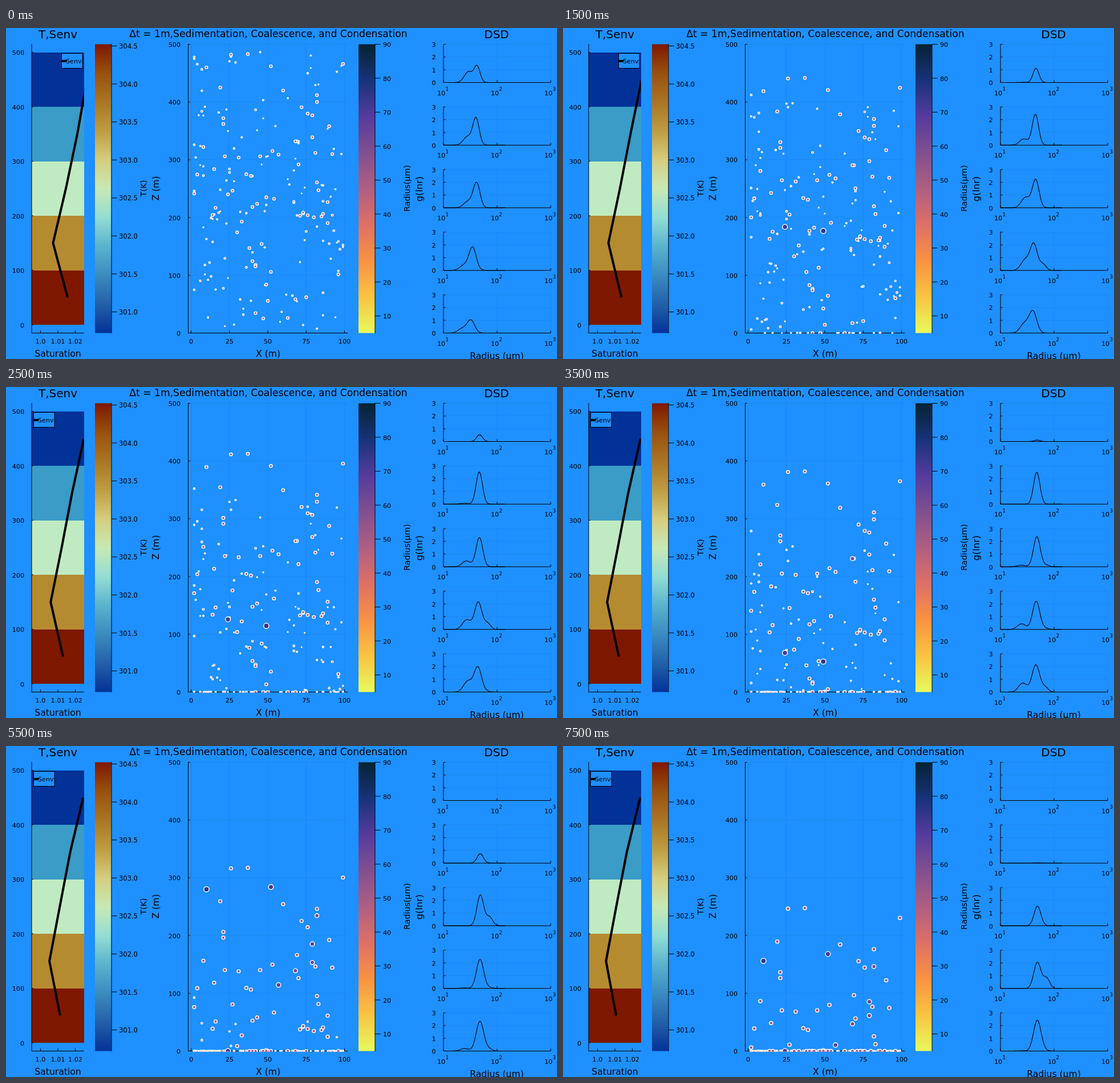
An HTML page that plays this animation: 966 px wide and 580 px high, repeating every 8000 ms.

```html
<!DOCTYPE html>
<html lang="en">
<head>
<meta charset="utf-8">
<title>Droplet column</title>
<style>
html, body { margin: 0; width: 100%; height: 100%; overflow: hidden; background: #1e90ff; }
svg { display: block; width: 966px; height: 580px; font-family: "DejaVu Sans", sans-serif; }
</style>
</head>
<body>
<svg id="stage" viewBox="0 0 966 580" xmlns="http://www.w3.org/2000/svg"></svg>
<script>
const STEP = 500, STEPS = 16;
const THERMAL = ['#042333', '#17337a', '#553b9d', '#814f8f', '#af5f82', '#de7065', '#f99242', '#f9c441', '#e8fa5b'];
const ROMA = ['#7e1700', '#98500f', '#aa7524', '#be9c42', '#d5cd7e', '#c8e9b5', '#93ddd3', '#59b3ce', '#3a8bc0', '#2360a9', '#033198'];
const BANDS = ['#023198', '#3a9cc7', '#c0ebc2', '#b58b30', '#7e1700'];

let seed = 4127;
const rand = () => (seed = (seed * 16807) % 2147483647) / 2147483647;
const between = (lo, hi) => lo + (hi - lo) * rand();
const many = (n, make) => Array.from({ length: n }, make);
const anyX = () => Math.round(between(1, 99));

// Large drops: x, height, then merge step and fall per step for those that merge
const landmarks = [
  [37, 483], [26, 482], [99, 466], [60, 420], [19, 425], [82, 412], [72, 391], [76, 380],
  [90, 358], [69, 332], [92, 310], [8, 322], [22, 306], [21, 372], [21, 362], [45, 306],
  [10, 460, 10, 31], [52, 462, 10, 29], [82, 400, 11, 22], [79, 377, 8, 25], [79, 339, 8, 23],
  [68, 332, 7, 23], [57, 309, 8, 26], [24, 240, 2, 29], [49, 235, 2, 31]
];
const large = landmarks.concat(many(42, () => [anyX(), between(3, 320)]));

// Small drops: the finer they are, the sooner they speed up
const small = many(128, () => {
  const fine = rand();
  return { x: anyX(), z: between(0, 500), v: between(16, 29), a: 1.4 + 1.3 * fine, r: 34 - 14 * fine };
});

const PANELS = 5, PANEL_H = 67;
const panelTop = i => 28.5 + i * 109.75;
// Main peak of each spectrum: first x, first height, last height, step of fading
const peaks = [[826, 1.25, 1.5, 4.5], [824, 2.1, 2.8, 10], [825, 1.95, 2.5, 15.5], [818, 1.8, 2.35, 17], [815, 1, 2.5, 99]];
// Merged drops reach a panel at a step and the next panel some steps later
const waves = [{ panel: 3, step: 4, size: .6 }, { panel: 2, step: 10, size: .85 }];

const px = x => 324.5 + x * 2.69;
const pz = z => 534.5 - z * 1.012;
const bandY = z => 520 - z * .955;
const satX = s => 60.5 + (s - 1) * 3050;
const tempY = t => 31.5 + (304.5 - t) * 133.14;
const sizeY = r => 28.5 + (90 - r) * 5.95;
const mix = (a, b, f) => a + (b - a) * f;
const bell = d => Math.exp(-d * d);
const settle = (k, tau) => 1 - Math.exp(-k / tau);
const clamp = (v, lo, hi) => Math.min(hi, Math.max(lo, v));

function heat(r) {
  const p = clamp((90 - r) / 85 * 8, 0, 7.999), i = Math.floor(p);
  const part = (c, n) => parseInt(c.slice(n, n + 2), 16);
  return `rgb(${[1, 3, 5].map(n => Math.round(mix(part(THERMAL[i], n), part(THERMAL[i + 1], n), p - i)))})`;
}

// Markup helpers
const line = (x1, y1, x2, y2, o = 1) =>
  `<path d="M${x1} ${y1}L${x2} ${y2}" stroke="#000" stroke-opacity="${o}"/>`;
const grid = (x1, y1, x2, y2) => line(x1, y1, x2, y2, .06);
const rect = (x, y, w, h, fill, more = '') =>
  `<rect x="${x}" y="${y}" width="${w}" height="${h}" fill="${fill}" ${more}/>`;
const text = (s, x, y, size = 11.2, anchor = 'middle', more = '') =>
  `<text x="${x}" y="${y + size * .365}" font-size="${size}" text-anchor="${anchor}" ${more}>${s}</text>`;
const upright = (s, x, y, size) => text(s, x, y, size, 'middle', `transform="rotate(-90 ${x} ${y})"`);
const ramp = (id, colors) => `<linearGradient id="${id}" x1="0" y1="0" x2="0" y2="1">` +
  colors.map((c, i) => `<stop offset="${i / (colors.length - 1)}" stop-color="${c}"/>`).join('') + '</linearGradient>';

function tempPanel() {
  let s = BANDS.map((c, i) => rect(45, 42.5 + i * 95.5, 91.5, 95.5, c, 'shape-rendering="crispEdges"')).join('');
  for (let z = 0; z <= 500; z += 100)
    s += line(45, bandY(z), 48, bandY(z)) + text(z, 32, bandY(z) + .5, 11.2, 'end');
  for (const v of ['1.0', '1.01', '1.02'])
    s += line(satX(+v), 534.5, satX(+v), 530) + text(v, satX(+v), 549);
  return s + line(45, 28, 45, 535) + line(45, 534.5, 136.5, 534.5) +
    text('T,Senv', 91, 10.3, 20) + text('Saturation', 91, 570, 15.6);
}

function colorBars() {
  let s = rect(156, 28.5, 28.5, 506, 'url(#roma)') + rect(618, 28.5, 29, 506, 'url(#thermal)') +
    line(185, 28, 185, 535) + line(647, 28, 647, 535);
  for (let t = 301; t <= 304.5; t += .5)
    s += line(185, tempY(t), 194.5, tempY(t)) + text(t.toFixed(1), 198, tempY(t) + .5, 11.5, 'start');
  for (let r = 10; r <= 90; r += 10)
    s += line(647, sizeY(r), 656.5, sizeY(r)) + text(r, 661, sizeY(r) + .5, 11.2, 'start');
  return s + upright('T(K)', 241, 281, 14.2) + upright('Radius(µm)', 703, 281, 14.2);
}

function dropPanel() {
  let s = '';
  for (let z = 0; z <= 500; z += 100)
    s += grid(319, pz(z), 599, pz(z)) + line(319, pz(z), 322.5, pz(z)) + text(z, 306, pz(z) + .5, 11.2, 'end');
  for (let x = 0; x <= 100; x += 25)
    s += grid(px(x), 28, px(x), 534) + line(px(x), 534.5, px(x), 530) + text(x, px(x), 549);
  return s + line(319.5, 28, 319.5, 535) + line(319, 534.5, 599, 534.5) +
    text('Δt = 1m,Sedimentation, Coalescence, and Condensation', 460, 9.3, 17.15) +
    text('X (m)', 459.5, 570, 15.6) + upright('Z (m)', 262, 281, 15.6);
}

function spectrumPanel(i) {
  const top = panelTop(i), base = top + PANEL_H;
  let s = '';
  for (let g = 0; g <= 3; g++) {
    const y = base - g * PANEL_H / 3;
    s += grid(767, y, 955, y) + line(767, y, 770.5, y) + text(g, 753.5, y + .5, 11.2, 'end');
  }
  for (let e = 1; e <= 3; e++) {
    const x = 767 + (e - 1) * 94;
    s += grid(x, top, x, base) + line(x, base, x, base - 4) +
      text('10', x + 3.2, base + 18, 11.2, 'end') + text(e, x + 3.4, base + 11.5, 8.6, 'start');
  }
  return s + line(767, top, 767, base) + line(767, base, 955, base);
}

// A main peak, a shoulder of fine drops that drifts left, and bumps of merged drops
function spectrum(i, k) {
  const [x0, h0, h1, fade] = peaks[i];
  const c = mix(x0, 832, settle(k, 4));
  const h = mix(h0, h1, settle(k, 5)) / (1 + Math.exp(k - fade));
  const left = c - clamp(15 + 2.6 * (k - i), 15, 27);
  const fine = .85 * bell((k - 1.2 * i) / (1.5 + .9 * i));
  const merged = waves.reduce((sum, w) =>
    i < w.panel ? sum : sum + w.size * bell((k - w.step - 4.5 * (i - w.panel)) / 2.2), 0);
  return x => h * bell((x - c) / (7.4 + .5 * i)) + fine * bell((x - left) / 10.5) + merged * bell((x - c - 16) / 8);
}

function curve(i, k) {
  const g = spectrum(i, k), base = panelTop(i) + PANEL_H;
  let d = '';
  for (let x = 767; x <= 875; x++)
    d += (d ? 'L' : 'M') + x + ' ' + (base - g(x) * PANEL_H / 3).toFixed(2);
  return `<path d="${d}" fill="none" stroke="#000" stroke-width="1.1"/>`;
}

const dot = (x, z, r) => `<circle cx="${px(x).toFixed(1)}" cy="${pz(Math.max(0, z)).toFixed(1)}" ` +
  `r="${(r * .07 - .6).toFixed(2)}" fill="${heat(r)}" stroke="#fff" stroke-width="1.4"/>`;

const fall = k => 13.3 * k + .16 * k * k;

function dropDots(k) {
  let s = '';
  for (const p of small) s += dot(p.x, p.z - p.v * k - p.a * k * k, p.r);
  for (const [x, z, merge = STEPS, v] of large)
    s += k < merge ? dot(x, z - fall(k), 43 + k * .6)
      : dot(x, z - fall(merge) - v * (k - merge), 45 + (v - 14) * 1.75);
  return s;
}

// Each point of the line eases to its final place, the upper ones sooner
function saturation(k) {
  const first = [108, 82.5, 105, 125, 142], last = [90.5, 74.5, 92.5, 111.5, 135.2];
  const pts = first.map((x, i) =>
    mix(x, last[i], settle(k, 8 - 1.2 * i)).toFixed(1) + ',' + bandY(50 + i * 100).toFixed(1)).join(' ');
  const x = k < 4 ? 97.5 : 48.5;
  return `<polyline points="${pts}" fill="none" stroke="#000" stroke-width="4" stroke-linejoin="round" clip-path="url(#satClip)"/>` +
    rect(x, 44.5, 36.5, 26, '#1e90ff', 'stroke="#000"') +
    rect(x, 56, 8.5, 4, '#000') + text('Senv', x + 7.5, 58, 11.2, 'start');
}

const panels = draw => Array.from({ length: PANELS }, (_, i) => draw(i)).join('');
const stage = document.getElementById('stage');
stage.innerHTML = '<defs>' + ramp('roma', ROMA) + ramp('thermal', THERMAL) +
  '<clipPath id="satClip"><rect x="45" y="28" width="91.5" height="507"/></clipPath>' +
  '<clipPath id="dropClip"><rect x="319" y="28" width="280" height="507.5"/></clipPath></defs>' +
  tempPanel() + colorBars() + dropPanel() + panels(spectrumPanel) +
  text('DSD', 860, 10.3, 20) + text('Radius (µm)', 860.5, 574.5, 15.6) + upright('g(lnr)', 724, 282, 16.2) +
  '<g id="line"></g><g id="dots" clip-path="url(#dropClip)"></g><g id="curves"></g>';
const [lineLayer, dotLayer, curveLayer] = ['line', 'dots', 'curves'].map(id => document.getElementById(id));

let shown = -1;
function show(k) {
  if (k === shown) return;
  shown = k;
  lineLayer.innerHTML = saturation(k);
  dotLayer.innerHTML = dropDots(k);
  curveLayer.innerHTML = panels(i => curve(i, k));
}

show(0);
const start = performance.now();
function tick() {
  show(Math.floor((performance.now() - start) / STEP) % STEPS);
  requestAnimationFrame(tick);
}
requestAnimationFrame(tick);
</script>
</body>
</html>
```
